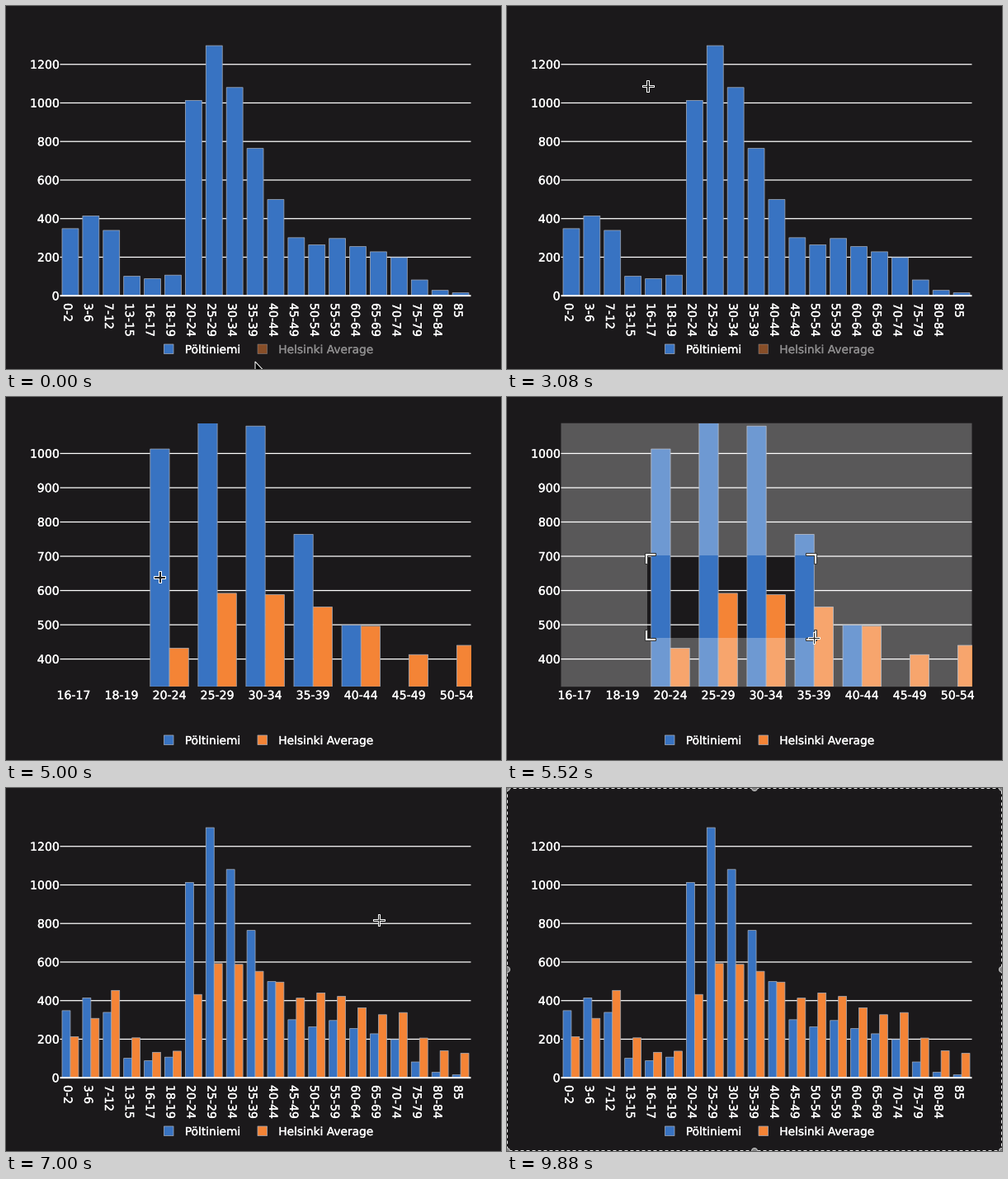
A matplotlib script that plays this animation: 600 px wide and 440 px high, repeating every 9.92 s.

```python
import numpy as np
import matplotlib.pyplot as plt
from matplotlib.animation import FuncAnimation
from matplotlib.patches import Circle, PathPatch, Polygon, Rectangle
from matplotlib.path import Path
from matplotlib.patheffects import withStroke

W, H, STEP, LOOP = 600, 440, 40, 9920
BG, BLUE, ORANGE, EDGE = "#1b191b", "#3873c2", "#f48436", "#a4abb8"
L, R, T, B = 65.5, 563.5, 31.7, 351.2
PX = 0.72  # one pixel in points

# Residents per age band
STARTS = [0, 3, 7, 13, 16, 18, *range(20, 86, 5)]
AGES = [f"{a}-{b - 1}" for a, b in zip(STARTS, STARTS[1:])] + ["85"]
LOCAL = [348, 414, 339, 101, 88, 107, 1013, 1297, 1080, 764,
         499, 301, 264, 297, 255, 228, 198, 82, 28, 15]
CITY = [213, 308, 453, 207, 132, 138, 432, 592, 588, 552,
        496, 413, 440, 422, 363, 327, 338, 206, 140, 127]

plt.rcParams["font.family"] = "DejaVu Sans"
fig = plt.figure(figsize=(W / 100, H / 100), dpi=100, facecolor=BG)
ax = fig.add_axes([0, 0, 1, 1])
ax.set_xlim(0, W)
ax.set_ylim(H, 0)
ax.axis("off")
clip = Rectangle((L, T), R - L, B - T, transform=ax.transData)


def rect(x0, y0, x1, y1, color, **kw):
    return ax.add_patch(Rectangle((x0, y0), x1 - x0, y1 - y0, fc=color,
                                  snap=False, **kw))


def label(x, y, s, ha="left", size=14.1, color="white", **kw):
    bold = withStroke(linewidth=0.25 * PX, foreground=color)
    return ax.text(x, y, s, color=color, size=size * PX, ha=ha,
                   va="baseline", path_effects=[bold], **kw)


def hline(y, width, z):
    return ax.plot([L, R], [y, y], color="white", lw=width * PX, zorder=z,
                   solid_capstyle="butt", snap=False)[0]


def zoom(view, start, end):
    """Range of the chart inside a box dragged over a view."""
    first, last, low, high = view
    xs = [first + (x - L) / (R - L) * (last - first)
          for x in (start[0], end[0])]
    ys = [low + (B - y) / (B - T) * (high - low) for y in (end[1], start[1])]
    return (*xs, *ys)


def scene(view, both):
    """One view of the chart as a list of hidden artists."""
    first, last, low, high = view
    unit = (R - L) / (last - first)
    scale = (B - T) / (high - low)
    xpos = lambda i: L + (i - first) * unit
    ypos = lambda v: B - (v - low) * scale
    upright = unit > 50
    parts = []

    tick = next(s for s in (20, 50, 100, 200) if s >= (high - low) / 8)
    for v in np.arange(np.ceil(low / tick) * tick, high, tick):
        y = ypos(v)
        parts.append(label(64.5, y + 5.2, f"{v:.0f}", "right"))
        parts.append(hline(y, 2, 4) if v == 0 else hline(y, 1.25, 1))

    for i, name in enumerate(AGES):
        x = xpos(i)
        if L <= x <= R:
            if upright:
                parts.append(label(x, 366.2, name, "center"))
            else:
                parts.append(label(x - 7.8, 360, name, rotation=-90,
                                   rotation_mode="anchor"))
        left, mid, right = x - 0.4 * unit, x, x + 0.4 * unit
        bars = [(left, mid if both else right, LOCAL[i], BLUE)]
        if both:
            bars.append((mid, right, CITY[i], ORANGE))
        for x0, x1, v, color in bars:
            if v > low and x1 > L and x0 < R:
                bar = rect(x0, ypos(v), x1, B, color, ec=EDGE,
                           lw=0.75 * PX, zorder=3)
                bar.set_clip_path(clip)
                parts.append(bar)

    entries = [(191.5, "Pöltiniemi", BLUE, True),
               (305, "Helsinki Average", ORANGE, both)]
    for x, name, color, active in entries:
        parts.append(rect(x, 410, x + 11.5, 421.5, color, ec=EDGE,
                          lw=0.75 * PX, alpha=1 if active else 0.5))
        parts.append(label(x + 25.3, 421, name, size=13.75,
                           color="white" if active else "#8d8c8d"))
    for p in parts:
        p.set_visible(False)
    return parts


# Places the pointer visits
ENTRY, LEGEND, REST, EXIT = (302, 431), (311, 420), (452, 160), (560, 4)
BOX1 = (170.5, 96.8), (384.1, 276.6)
BOX2 = (170, 192), (372, 292)

FULL = (-0.5, 19.5, 0, 1367)
NEAR = zoom(FULL, *BOX1)
CLOSE = zoom(NEAR, *BOX2)
SCENES = [(0, scene(FULL, False)), (920, scene(FULL, True)),
          (2400, scene(FULL, False)), (3600, scene(NEAR, False)),
          (4400, scene(NEAR, True)), (5680, scene(CLOSE, True)),
          (6600, scene(FULL, True))]

# Arrival, departure, place
STOPS = [(0, 120, ENTRY), (560, 2200, LEGEND), (3080, 3080, BOX1[0]),
         (3480, 3640, BOX1[1]), (4000, 4480, LEGEND),
         (5140, 5140, BOX2[0]), (5520, 5720, BOX2[1]),
         (6280, 8080, REST), (8480, LOOP, EXIT)]
DRAGS = [(3080, 3600, BOX1[0]), (5140, 5680, BOX2[0])]
FINISH = 8520

dim = ax.add_patch(PathPatch(Path([(0, 0), (0, 0)]), fc="white", ec="none",
                             snap=False, zorder=6))
corners = [ax.add_patch(Polygon([(0, 0)] * 3, fc="white", ec="#333333",
                                lw=PX, zorder=7)) for _ in range(4)]


def arc(cx, cy, rx, ry, start, end):
    a = np.radians(np.linspace(start, end, 16))
    return np.column_stack([cx + rx * np.cos(a), cy + ry * np.sin(a)])


def plus(half, arm):
    quarter = np.array([half - 1j * arm, half - 1j * half, arm - 1j * half])
    z = np.concatenate([quarter * 1j ** k for k in range(4)])
    return np.column_stack([z.real, z.imag])


# Pointer outlines around their hot spots, with fill and edge
POINTERS = {
    "arrow": (np.array([(0, 0), (0, 16), (4, 12.5), (6, 18), (8.5, 17),
                        (6.2, 11.8), (11, 11.6)]), "black", "white"),
    "hand": (np.vstack([arc(0, 1.6, 1.6, 1.6, 180, 360),
                        arc(2, 10.5, 6, 4.8, -90, 235)]), "white", "black"),
    "cross": (plus(1.2, 7), "#222222", "white"),
}
pointer = ax.add_patch(Polygon([(0, 0)] * 3, lw=PX, zorder=9))
knuckles = [ax.plot([], [], color="black", lw=0.8 * PX, zorder=10)[0]
            for _ in range(3)]

# Capture frame with handles
outline = (0.5, 0.5, W - 0.5, H - 0.5, "none")
border = [rect(*outline, ec="black", lw=PX, zorder=11),
          rect(*outline, ec="#e6e6e6", lw=PX, ls=(0, (4, 3)), zorder=12)]
border += [ax.add_patch(Circle((x, y), 3.5, fc="#858585", ec="#c8c8c8",
                               lw=PX, zorder=13))
           for x in (0, W / 2, W) for y in (0, H / 2, H)
           if (x, y) != (W / 2, H / 2)]


def pointer_at(t):
    for (_, leave, p), (arrive, _, q) in zip(STOPS, STOPS[1:]):
        if t <= arrive:
            u = max(0, (t - leave) / (arrive - leave))
            u = u * u * (3 - 2 * u)
            return p[0] + (q[0] - p[0]) * u, p[1] + (q[1] - p[1]) * u
    return EXIT


def box(x0, y0, x1, y1):
    return [(x0, y0), (x1, y0), (x1, y1), (x0, y1), (x0, y0)]


def draw_selection(t, x, y):
    drag = next((d for d in DRAGS if d[0] < t < d[1]), None)
    for p in [dim] + corners:
        p.set_visible(drag is not None)
    if drag is None:
        return
    start, _, (x0, y0) = drag
    fade = min(1, (t - start) / 200)
    codes = [Path.MOVETO] + [Path.LINETO] * 3 + [Path.CLOSEPOLY]
    dim.set_path(Path(box(L, T, R, B) + box(x0, y0, x, y)[::-1], codes * 2))
    dim.set_alpha(0.275 * fade)
    arm = min(10, (x - x0) / 2, (y - y0) / 2)
    signs = [(sx, sy) for sx in (-1, 1) for sy in (-1, 1)]
    for p, (sx, sy) in zip(corners, signs):
        cx, cy = (x0 if sx < 0 else x), (y0 if sy < 0 else y)
        ox, oy = cx + 3 * sx, cy + 3 * sy
        ix, iy = cx - arm * sx, cy - arm * sy
        p.set_xy([(ox, oy), (ix, oy), (ix, cy), (cx, cy), (cx, iy),
                  (ox, iy)])
        p.set_alpha(fade)


def draw_pointer(t, x, y):
    if L <= x <= R and T <= y <= B:
        kind = "cross"
    elif 190 <= x <= 450 and 406 <= y <= 426:
        kind = "hand"
    else:
        kind = "arrow"
    shape, fill, edge = POINTERS[kind]
    pointer.set_xy(shape + (x, y))
    pointer.set_facecolor(fill)
    pointer.set_edgecolor(edge)
    pointer.set_visible(t < FINISH)
    for k, line in enumerate(knuckles):
        kx = x + 1 + 2 * k
        line.set_data([kx, kx], [y + 9, y + 12.5])
        line.set_visible(kind == "hand" and t < FINISH)


def update(frame):
    t = frame * STEP
    current = max(k for k, (start, _) in enumerate(SCENES) if t >= start)
    for k, (_, parts) in enumerate(SCENES):
        for p in parts:
            p.set_visible(k == current)
    x, y = pointer_at(t)
    draw_selection(t, x, y)
    draw_pointer(t, x, y)
    for p in border:
        p.set_visible(t >= FINISH)
    return []


anim = FuncAnimation(fig, update, frames=LOOP // STEP, interval=STEP,
                     repeat=True, repeat_delay=0, blit=False)
plt.show()
```
